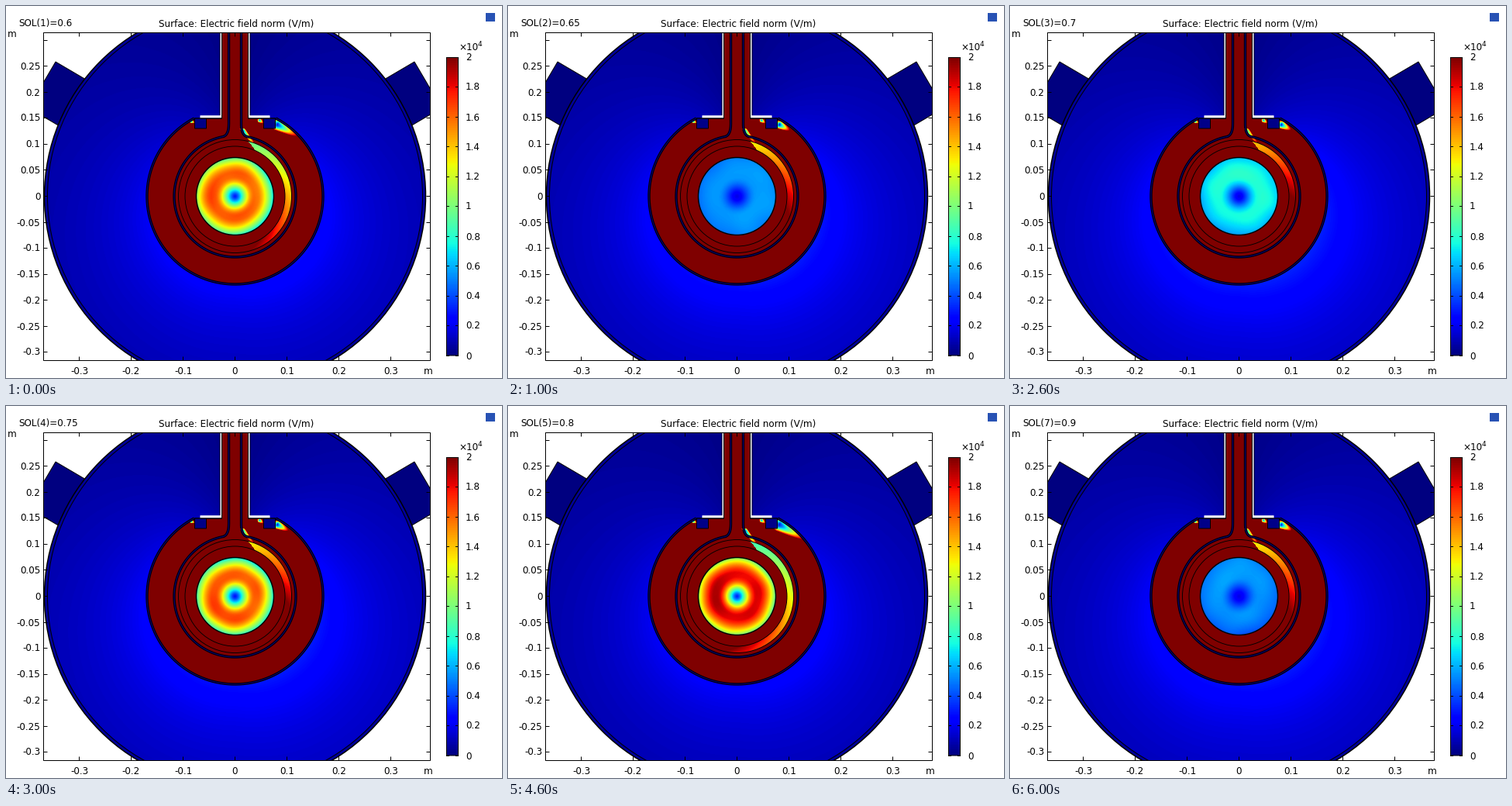
These frames come from a looping animation (640x480 px, 7 s). A matplotlib script:

```python
import numpy as np
import matplotlib.pyplot as plt
from matplotlib.animation import FuncAnimation
from matplotlib.patches import Circle, Polygon, Rectangle

plt.rcParams.update({"font.family": "DejaVu Sans", "path.snap": False})

DPI = 80
PX = 72 / DPI                      # one pixel in points
CX, CY = 295.5, 245.5              # position of the origin
SCALE = 671                        # pixels per metre
LEFT, RIGHT, TOP, BOTTOM = 48, 548, 34, 458
R_OUT, R_WALL, R_DISC, R_RING = 246, 242, 113.5, 78.5
R_GAP, R_TUBE, R_CORE = 73, 64.5, 50
FLAT = 145                         # flat top of the disc
NAVY = "#000070"

# core plateau, core edge, core centre, tilt, tilt angle,
# arc start value, arc end angle, hot spot length, outside strength
STEPS = [
    (1.62, 0.85, 0.30, 0.15, 170, 0.95, 165, 32, 0.25),
    (0.56, 0.50, 0.18, 0.03, 0, 1.30, 112, 16, 0.28),
    (0.77, 0.62, 0.18, 0.05, 45, 1.40, 95, 15, 0.30),
    (1.62, 0.78, 0.28, 0.08, 215, 1.30, 102, 17, 0.285),
    (1.85, 1.00, 0.32, 0.10, 170, 0.85, 195, 42, 0.24),
    (0.92, 0.68, 0.18, 0.13, 130, 1.15, 140, 25, 0.27),
    (0.55, 0.47, 0.18, 0.05, 100, 1.30, 112, 16, 0.28),
]

X, Y = np.meshgrid(np.arange(LEFT, RIGHT) + 0.5, np.arange(TOP, BOTTOM) + 0.5)
DX, DY = X - CX, CY - Y
R = np.hypot(DX, DY)
THETA = np.arctan2(DY, DX)
PHI = np.degrees(np.arctan2(DX, DY)) % 360    # clockwise from the top

DISC = (R < R_DISC) & (Y > FLAT)
STEM = (abs(DX) < 17.5) & (Y <= FLAT + 1)


def port(side):
    pts = [(101.5, 94), (64, 72), (29, 131.5), (66.5, 153.5), (96, 130)]
    return [(CX + side * (CX - x), y) for x, y in pts]


def spot(x, y, angle, length, width, low):
    """Elongated cool spot that rises to the top of the scale."""
    a = np.radians(angle)
    u = (X - x) * np.cos(a) + (Y - y) * np.sin(a)
    v = (Y - y) * np.cos(a) - (X - x) * np.sin(a)
    u = np.where(u < 0, -2 * u, u)
    return low + 1.8 * u / length + 1.6 * (v / width) ** 2


def core(step, plateau, edge, centre, tilt, angle):
    t = R / R_CORE
    rise = np.sin(np.pi / 2 * np.clip(t / 0.52, 0, 1)) ** 1.5
    fall = np.clip((t - 0.6) / 0.4, 0, 1) ** 1.5
    v = centre + (plateau - centre) * rise + (edge - plateau) * fall
    v += tilt * np.cos(THETA - np.radians(angle)) * np.minimum(t, 1) ** 2
    rng = np.random.default_rng(step + 4)
    for _ in range(4):
        kx, ky = rng.uniform(-0.14, 0.14, 2)
        v += 0.012 * plateau * rise * np.sin(kx * DX + ky * DY + rng.uniform(0, 6.28))
    return v


def field(step):
    plateau, edge, centre, tilt, angle, start, end, hot, outer = STEPS[step]
    shield = np.sin(np.radians(PHI) / 2) ** 0.65
    skew = 1 + 0.2 * np.maximum(np.cos(THETA), 0)
    v = outer * (R_DISC / np.maximum(R, R_DISC)) ** 1.2 * shield * skew
    v[R > R_WALL] = 0.05

    inside = np.full_like(v, 2.0)
    for s in (spot(350, 153, 28, hot, 3.5 + hot / 8, 0.3),
              spot(327, 147.5, 35, 7, 3, 0.45),
              spot(239, 149, 20, 6, 2.5, 0.5)):
        inside = np.minimum(inside, np.where(R > R_RING, s, 2))
    leak = spot(306.5, 161, 52, 34, 3.4, 0.6 * start)
    inside = np.minimum(inside, np.where((R > R_GAP - 5) & (R < 88), leak, 2))

    depth = (R_GAP - R) / (R_GAP - R_TUBE)
    begin = 13 + 11 * depth                   # slanted tip of the arc
    turn = (PHI - 13) / (end - 13) + 0.1 * depth
    arc = start + (2 - start) * np.clip(turn, 0, 1) ** 1.3
    on_arc = (depth > 0) & (depth < 1) & (PHI > begin) & (turn < 1)
    inside = np.where(on_arc, np.minimum(arc, inside), inside)

    v = np.where(DISC | STEM, inside, v)
    v = np.where(R < R_CORE, core(step, plateau, edge, centre, tilt, angle), v)
    return np.ma.masked_where((R > R_OUT) & ~STEM, v)


fig = plt.figure(figsize=(640 / DPI, 480 / DPI), dpi=DPI, facecolor="white")
ax = fig.add_axes([0, 0, 1, 1])
ax.set_xlim(0, 640)
ax.set_ylim(480, 0)
ax.axis("off")
window = Rectangle((LEFT, TOP), RIGHT - LEFT, BOTTOM - TOP,
                   transform=ax.transData)


def line(x, y, width=1, color="black", z=4):
    ln, = ax.plot(x, y, color=color, lw=width * PX, zorder=z,
                  solid_capstyle="butt")
    ln.set_clip_path(window)


def shape(patch, fill="none", width=1, z=3, edge="black"):
    patch.set(facecolor=fill, edgecolor=edge, linewidth=width * PX, zorder=z)
    ax.add_patch(patch)
    patch.set_clip_path(window)


def wall(x, y):
    """Thin metal layer between two black lines."""
    line(x, y, 3.4)
    line(x, y, 1.2, NAVY)


def box(x, y, w, h):
    ax.add_patch(Rectangle((x, y), w, h, fill=False, edgecolor="black",
                           linewidth=PX, zorder=8))


def label(x, y, text, ha="left", size=12):
    return ax.text(x, y, text, ha=ha, va="baseline", fontsize=size * PX,
                   color="black", zorder=9)


# vessel and ports
image = ax.imshow(field(0), cmap="jet", vmin=0, vmax=2, aspect="auto",
                  extent=(LEFT, RIGHT, BOTTOM, TOP), interpolation="nearest",
                  zorder=2)
for side in (-1, 1):
    shape(Polygon(port(side)), "#000080", z=1)
shape(Circle((CX, CY), R_OUT), width=1.5)
shape(Circle((CX, CY), R_WALL), width=1)

# disc outline with flat top
cut = np.arcsin((CY - FLAT) / R_DISC)
a = np.linspace(np.pi - cut, 2 * np.pi + cut, 240)
wall(CX + R_DISC * np.cos(a), CY - R_DISC * np.sin(a))
half = R_DISC * np.cos(cut)

# inner ring flowing into the stem
b = np.linspace(0, 1, 16)
lip = np.radians(11)
ex, ey = R_RING * np.sin(lip), CY - R_RING * np.cos(lip)
bend_x = (1 - b) ** 2 * 8 + 2 * b * (1 - b) * 8 + b ** 2 * ex
bend_y = (1 - b) ** 2 * 152 + 2 * b * (1 - b) * 166 + b ** 2 * ey
side_x = np.r_[8, bend_x]
side_y = np.r_[TOP, bend_y]
a = np.linspace(lip, 2 * np.pi - lip, 240)
wall(np.r_[CX + side_x, CX + R_RING * np.sin(a), CX - side_x[::-1]],
     np.r_[side_y, CY - R_RING * np.cos(a), side_y[::-1]])

for radius, width in ((R_GAP, 0.9), (R_TUBE, 0.9), (R_CORE, 1.5)):
    shape(Circle((CX, CY), radius), width=width, z=4)

# collar and notches on both sides of the stem
for side in (-1, 1):
    line([CX + side * half, CX + side * 17], [FLAT, FLAT], 1.2)
    x0 = CX + side * 44.5
    shape(Rectangle((x0 - 7.5, FLAT), 15, 13), "#000088", z=5)
    collar = [(45, 141.2), (19.2, 141.2), (19.2, TOP), (17.4, TOP),
              (17.4, FLAT - 0.5), (45, FLAT - 0.5)]
    shape(Polygon([(CX + side * x, y) for x, y in collar]), "white", 0, z=6,
          edge="none")
    line([CX + side * 17] * 2, [TOP, FLAT], 1, z=7)
    line([CX + side * 19.5] * 2, [TOP, 141], 0.7, z=7)
    line([CX + side * 45, CX + side * 16.5], [FLAT, FLAT], 1, z=7)

# axes frame, ticks and labels
frame_x, frame_y = (48.5, 547.5), (34.5, 457.5)
box(48.5, 34.5, 499, 423)
for k in range(-3, 4):
    x = np.floor(CX + k * 0.1 * SCALE) + 0.5
    for y, d in zip(frame_y, (5, -5)):
        line([x, x], [y, y + d], z=8)
    label(x, 475, f"{k / 10:g}", "center")
for k in range(-6, 7):
    y = np.floor(CY - k * 0.05 * SCALE) + 0.5
    for x, d in zip(frame_x, (5, -5)):
        line([x, x + d], [y, y], z=8)
    if k < 6:
        label(44.5, y + 4, f"{k / 20:g}", "right")
label(539, 475, "m")
label(2, 40, "m")
label(197, 26, "Surface: Electric field norm (V/m)")
caption = label(16, 26, "")

# colour bar
ax.imshow(np.linspace(2, 0, 385)[:, None], cmap="jet", vmin=0, vmax=2,
          aspect="auto", extent=(568, 584, 451, 66), zorder=2)
box(568.5, 66.5, 15, 384.5)
for k in range(11):
    y = np.floor(451 - 38.5 * k) + 0.5
    for x in (568.5, 580.5):
        ax.plot([x, x + 3], [y, y], color="black", lw=PX, zorder=8)
    label(593, y + 4, f"{k / 5:g}")
label(584, 57, "×10")
label(609, 52, "4", size=9)

ax.add_patch(Rectangle((619, 9), 12, 11, facecolor="#2852b4", zorder=9))

ax.set_xlim(0, 640)
ax.set_ylim(480, 0)


def update(step):
    image.set_data(field(step))
    caption.set_text(f"SOL({step + 1})={round(0.6 + 0.05 * step, 2):g}")
    return image, caption


anim = FuncAnimation(fig, update, frames=len(STEPS), interval=1000,
                     repeat=True, repeat_delay=0)
plt.show()
```
